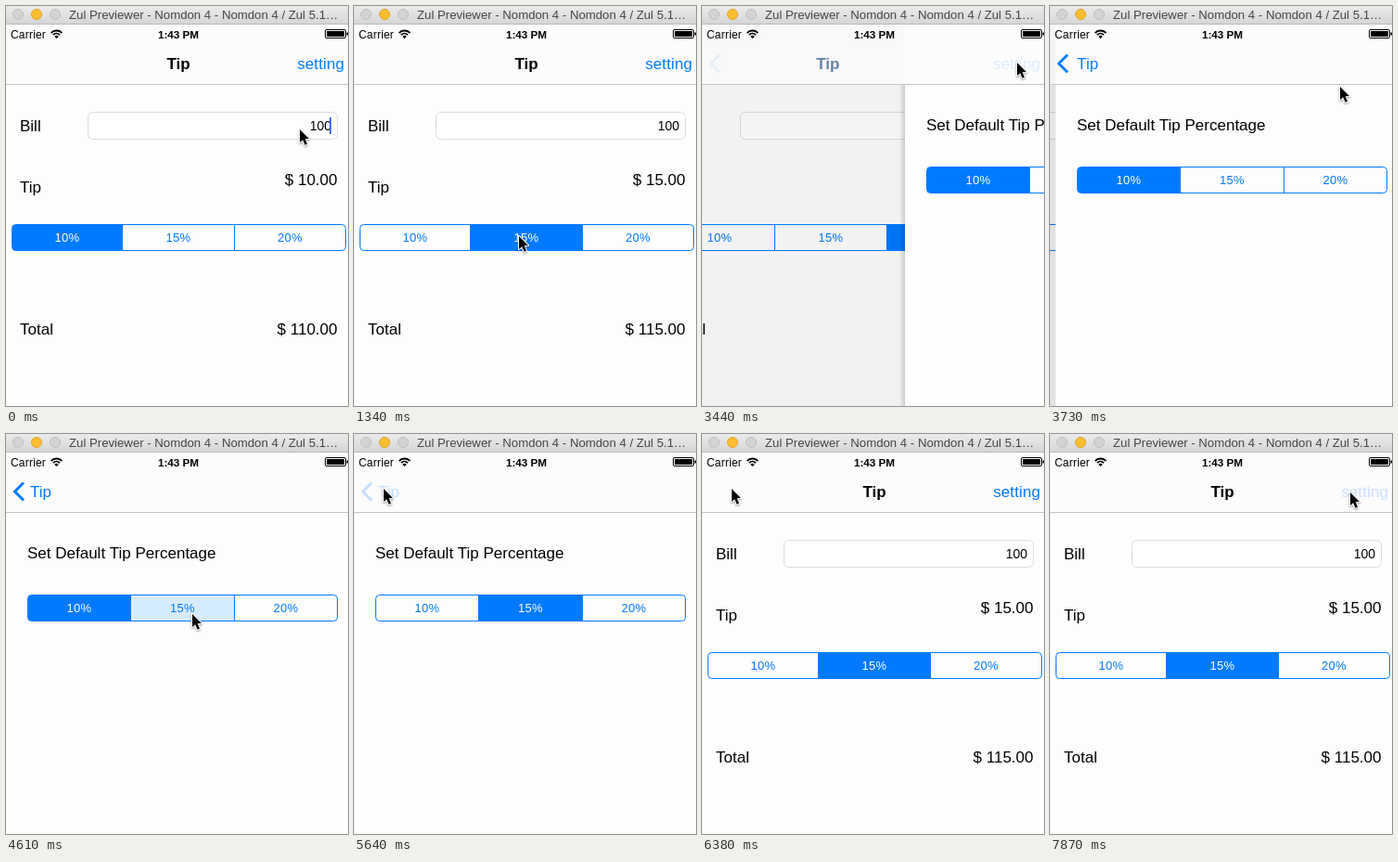
Animation, 369 px wide and 431 px high, one loop 8 s. Source, as an HTML page with a canvas:

```html
<!DOCTYPE html>
<html lang="en">
<head>
<meta charset="utf-8">
<title>Tip calculator</title>
<style>
html, body { margin: 0; width: 369px; height: 431px; overflow: hidden; background: #fdfdfd; }
canvas { display: block; }
</style>
</head>
<body>
<canvas id="stage" width="369" height="431"></canvas>
<script>
const ctx = document.getElementById('stage').getContext('2d');
const W = 369, H = 431, PAGE = 375, LOOP = 8000;
const BLUE = '#007aff', PAPER = '#fdfdfd';
const RATES = [10, 15, 20], BILL = 100;

const CADENCE = [[0, 0], [1050, 7], [1340, 9], [1960, 13], [3440, 23], [5640, 38], [7870, 53], [8000, 54]];

// Pointer legs: [start, end, x, y]
const LEGS = [
  [0, 750, 178, 248],
  [1340, 1880, 300, 250],
  [2260, 3000, 340, 61],
  [3500, 4320, 201, 194],
  [4760, 5490, 32, 59],
  [6990, 7730, 324, 63]
];

const clamp = v => Math.min(1, Math.max(0, v));
const smooth = v => v * v * (3 - 2 * v);
const during = (t, a, b) => t >= a && t < b;
const settle = (t, start) => t < start ? 0 : 1 - Math.exp(-12 * (t - start) / 1000);

function snap(t) {
  const i = CADENCE.findIndex(k => t < k[0]) - 1;
  const [a, from] = CADENCE[i], [b, to] = CADENCE[i + 1];
  const step = (b - a) / (to - from);
  return a + Math.floor((t - a) / step + 0.06) * step;
}

function pointerAt(t) {
  let x = 317, y = 133;
  for (const [a, b, tx, ty] of LEGS) {
    const k = smooth(clamp((t - a) / (b - a)));
    x += (tx - x) * k;
    y += (ty - y) * k;
  }
  return [Math.round(x), Math.round(y)];
}

// How far the settings page is pushed in, 0 to 1
function pushAt(t) {
  return t < 5740 ? settle(t, 3395) : 1 - settle(t, 5740);
}

function caretAt(t) {
  if (t > 3400) return false;
  return t >= 2650 || (t + 350) % 1000 < 500;
}

function text(str, x, y, size, { color = '#000', align = 'left', weight = '', gap = 0 } = {}) {
  ctx.font = `${weight} ${size}px "Liberation Sans", Arial, sans-serif`;
  ctx.letterSpacing = gap + 'px';
  ctx.textAlign = align;
  ctx.fillStyle = color;
  ctx.fillText(str, x, y);
}

function disc(x, y, r, fill, line) {
  ctx.beginPath();
  ctx.arc(x, y, r, 0, 7);
  ctx.fillStyle = fill;
  ctx.fill();
  ctx.strokeStyle = line;
  ctx.lineWidth = 1;
  ctx.stroke();
}

function box(x, y, w, h, r) {
  ctx.beginPath();
  ctx.roundRect(x, y, w, h, r);
}

function segments(edges, y, chosen, pressed) {
  const x0 = edges[0], x1 = edges[3];
  ctx.save();
  box(x0, y, x1 - x0, 28, 4);
  ctx.clip();
  RATES.forEach((rate, i) => {
    ctx.fillStyle = i === chosen ? BLUE : i === pressed ? '#d7ebff' : PAPER;
    ctx.fillRect(edges[i], y, edges[i + 1] - edges[i], 28);
  });
  ctx.restore();
  ctx.strokeStyle = BLUE;
  ctx.lineWidth = 1;
  box(x0, y, x1 - x0, 28, 4);
  for (const x of edges.slice(1, 3)) {
    ctx.moveTo(x, y);
    ctx.lineTo(x, y + 28);
  }
  ctx.stroke();
  RATES.forEach((rate, i) => {
    const color = i === chosen ? '#fff' : BLUE;
    text(rate + '%', (edges[i] + edges[i + 1]) / 2, y + 18.5, 13, { color, align: 'center', gap: 0.3 });
  });
}

function mainPage(t) {
  const chosen = t < 1150 ? 0 : t < 2050 ? 1 : t < 5600 ? 2 : 1;
  const pressed = during(t, 1000, 1150) ? 1 : during(t, 1900, 2050) ? 2 : -1;
  const tip = BILL * RATES[chosen] / 100;
  const right = { align: 'right' };

  text('Bill', 15, 135, 17);
  box(88.5, 114.5, 269, 29, 5);
  ctx.fillStyle = '#fff';
  ctx.fill();
  ctx.strokeStyle = '#dcdcdc';
  ctx.lineWidth = 1;
  ctx.stroke();
  text(String(BILL), 351, 134, 14, right);
  if (caretAt(t)) {
    ctx.fillStyle = '#426bf2';
    ctx.fillRect(349, 120, 2, 18);
  }
  text('Tip', 15, 201, 17);
  text('$ ' + tip.toFixed(2), 357.5, 193, 17, right);
  segments([6.5, 125.5, 246.5, 366.5], 235.5, chosen, pressed);
  text('Total', 15, 354, 17);
  text('$ ' + (BILL + tip).toFixed(2), 357.5, 354, 17, right);
}

function settingsPage(t) {
  ctx.fillStyle = PAPER;
  ctx.fillRect(0, 20, PAGE, H);
  text('Set Default Tip Percentage', 23, 134, 17);
  segments([23.5, 134.5, 246.5, 357.5], 173.5, t < 4680 ? 0 : 1, during(t, 4400, 4680) ? 1 : -1);
}

function pages(t, v) {
  ctx.save();
  ctx.translate(-Math.round(112.5 * v), 0);
  mainPage(t);
  ctx.restore();
  if (v < 0.001) return;

  const edge = Math.round(PAGE * (1 - v));
  ctx.fillStyle = `rgba(0,0,0,${0.1 * v})`;
  ctx.fillRect(0, 20, edge, H);
  const shade = ctx.createLinearGradient(edge - 6, 0, edge, 0);
  shade.addColorStop(0, 'rgba(0,0,0,0)');
  shade.addColorStop(1, `rgba(0,0,0,${0.16 * Math.min(1, 4 * (1 - v))})`);
  ctx.fillStyle = shade;
  ctx.fillRect(edge - 6, 85, 6, H);
  ctx.save();
  ctx.translate(edge, 0);
  settingsPage(t);
  ctx.restore();
}

function navBar(t, v) {
  ctx.fillStyle = 'rgba(252,252,252,0.7)';
  ctx.fillRect(0, 20, W, 64);
  ctx.fillStyle = '#c4c4c4';
  ctx.fillRect(0, 84, W, 1);

  const backHeld = during(t, 5600, 5740) ? 0.22 : 1;
  const settingHeld = during(t, 3200, 5000) || t > 7800 ? 0.2 : 1;

  ctx.globalAlpha = v * v * v * backHeld;
  ctx.strokeStyle = BLUE;
  ctx.lineWidth = 3;
  ctx.beginPath();
  ctx.moveTo(19, 52.5);
  ctx.lineTo(9.5, 62);
  ctx.lineTo(19, 71.5);
  ctx.stroke();

  // The title turns into the back label
  ctx.globalAlpha = (1 - 1.65 * v * (1 - v)) * backHeld;
  text('Tip', 173.5 - 147.5 * Math.pow(v, 1.23), 68, 17, {
    color: `rgb(0,${Math.round(122 * v)},${Math.round(255 * v)})`,
    weight: v < 0.5 ? 'bold' : ''
  });

  ctx.globalAlpha = (1 - v) * settingHeld;
  text('setting', 365, 68, 17, { color: BLUE, align: 'right', gap: 0.1 });
  ctx.globalAlpha = 1;
}

function statusBar() {
  text('Carrier', 5, 34.5, 12, { gap: 0.2 });
  text('1:43 PM', 186, 34.5, 11.7, { align: 'center', weight: 'bold' });

  ctx.strokeStyle = '#000';
  ctx.lineWidth = 1.8;
  for (const r of [4.8, 8]) {
    ctx.beginPath();
    ctx.arc(54.5, 34.5, r, -Math.PI * 0.76, -Math.PI * 0.24);
    ctx.stroke();
  }
  ctx.beginPath();
  ctx.moveTo(54.5, 35);
  ctx.arc(54.5, 35, 3, -Math.PI * 0.76, -Math.PI * 0.24);
  ctx.fillStyle = '#000';
  ctx.fill();

  box(344.5, 25.5, 22, 9, 1.5);
  ctx.lineWidth = 1;
  ctx.stroke();
  ctx.fillRect(346, 27, 19, 6);
  ctx.fillRect(367.5, 28.5, 1.5, 3);
}

function windowBar() {
  const g = ctx.createLinearGradient(0, 0, 0, 20);
  g.addColorStop(0, '#ebebeb');
  g.addColorStop(1, '#d5d5d5');
  ctx.fillStyle = g;
  ctx.fillRect(0, 0, W, 20);
  ctx.fillStyle = '#b9b9b9';
  ctx.fillRect(0, 19, W, 1);
  disc(13, 9, 5.5, '#d3d3d3', '#bfbfbf');
  disc(33, 9, 5.5, '#fdbd2f', '#e3a32a');
  disc(53, 9, 5.5, '#d3d3d3', '#bfbfbf');
  text('Zul Previewer - Nomdon 4 - Nomdon 4 / Zul 5.1…', 68, 14, 13.2, { color: '#454545' });
}

function pointer(x, y) {
  ctx.save();
  ctx.translate(x, y);
  ctx.beginPath();
  [[0, 0], [0, 14], [3.2, 11.2], [5.6, 16.8], [8, 15.8], [5.7, 10.3], [10, 10]]
    .forEach(p => ctx.lineTo(...p));
  ctx.closePath();
  ctx.lineJoin = 'round';
  ctx.lineWidth = 2.2;
  ctx.strokeStyle = '#fff';
  ctx.shadowColor = 'rgba(0,0,0,0.4)';
  ctx.shadowBlur = 2;
  ctx.shadowOffsetY = 1;
  ctx.stroke();
  ctx.shadowColor = 'transparent';
  ctx.fillStyle = '#000';
  ctx.fill();
  ctx.restore();
}

function draw(now) {
  const t = snap(now % LOOP);
  const v = pushAt(t);
  ctx.fillStyle = PAPER;
  ctx.fillRect(0, 0, W, H);
  pages(t, v);
  navBar(t, v);
  statusBar();
  windowBar();
  pointer(...pointerAt(t));
}

const begin = performance.now();
function tick() {
  draw(performance.now() - begin);
  requestAnimationFrame(tick);
}
tick();
</script>
</body>
</html>
```
